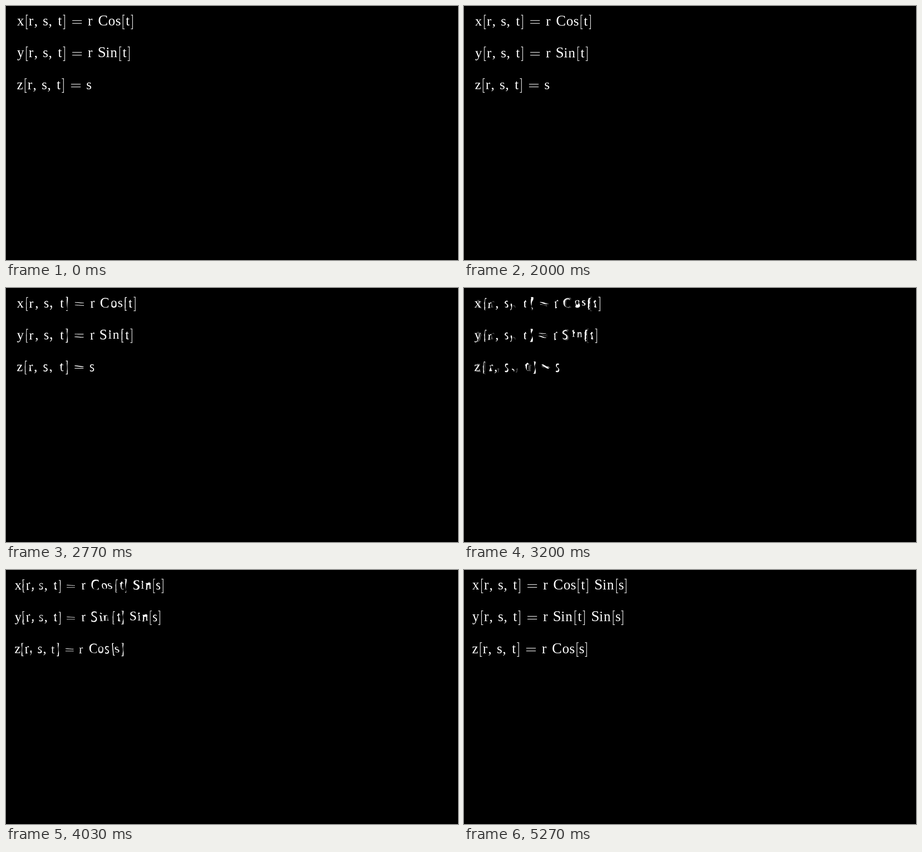
Write an HTML page with a canvas that moves like this. It is 998 by 561 pixels and loops after 7.01 s.

```html
<!DOCTYPE html>
<html lang="en">
<head>
<meta charset="utf-8">
<title>Cylindrical to spherical coordinates</title>
<style>
  html, body { margin: 0; width: 100%; height: 100%; overflow: hidden; background: #000; }
  canvas { display: block; }
</style>
</head>
<body>
<canvas id="stage" width="998" height="561"></canvas>
<script>
const LOOP = 7010, MORPH_START = 2000, MORPH_TIME = 3000;
const EM = 31.68, BASELINE = 43.2, LEADING = 70.2;
const LEFT_BEFORE = 23.7, LEFT_AFTER = 17.5;
const SAMPLES = 150, TRACE_SCALE = 8;

const LINES = [
  ['x[r, s, t] = r Cos[t]', 'x[r, s, t] = r Cos[t] Sin[s]'],
  ['y[r, s, t] = r Sin[t]', 'y[r, s, t] = r Sin[t] Sin[s]'],
  ['z[r, s, t] = s', 'z[r, s, t] = r Cos[s]'],
];

// Advance widths in em
const ADVANCE = {
  x: .528, y: .528, z: .444, r: .392, s: .394, t: .389, o: .5, i: .278, n: .556,
  C: .722, S: .556, '[': .278, ']': .278, ',': .278, '=': .778, ' ': .333,
};

// Thin symbols as bars: x, y above baseline, width, height in em
const BARS = {
  '[': [[.118, .75, .04, 1], [.118, .75, .137, .04], [.118, -.21, .137, .04]],
  ']': [[.119, .75, .04, 1], [.022, .75, .137, .04], [.022, -.21, .137, .04]],
  '=': [[.056, .367, .666, .04], [.056, .173, .666, .04]],
};

const ctx = document.getElementById('stage').getContext('2d');

function drawGlyph(c, char, x, y) {
  c.fillStyle = '#fff';
  if (BARS[char]) {
    for (const [bx, by, w, h] of BARS[char])
      c.fillRect(x + bx * EM, y - by * EM, w * EM, h * EM);
    return;
  }
  const size = /[A-Z]/.test(char) ? 32.8 : 30.6;
  c.font = `${size}px "Liberation Serif", serif`;
  c.textAlign = 'center';
  c.fillText(char, x + ADVANCE[char] * EM / 2, y);
}

function layout(text, x, y) {
  const glyphs = [];
  for (const char of text) {
    if (char !== ' ') glyphs.push({ char, x, y });
    x += ADVANCE[char] * EM;
  }
  return glyphs;
}

// Walk the edges between filled and empty pixels into closed loops
function traceLoops(char) {
  const w = 40 * TRACE_SCALE, h = 48 * TRACE_SCALE, ox = 6, oy = 32;
  const canvas = document.createElement('canvas');
  canvas.width = w;
  canvas.height = h;
  const c = canvas.getContext('2d', { willReadFrequently: true });
  c.scale(TRACE_SCALE, TRACE_SCALE);
  drawGlyph(c, char, ox, oy);
  const data = c.getImageData(0, 0, w, h).data;
  const filled = (x, y) => data[(y * w + x) * 4 + 3] > 127;
  const edges = new Map();
  const addEdge = (x1, y1, x2, y2) => {
    const key = y1 * w + x1;
    if (!edges.has(key)) edges.set(key, []);
    edges.get(key).push(y2 * w + x2);
  };
  for (let y = 1; y < h - 1; y++) {
    for (let x = 1; x < w - 1; x++) {
      if (!filled(x, y)) continue;
      if (!filled(x, y - 1)) addEdge(x, y, x + 1, y);
      if (!filled(x + 1, y)) addEdge(x + 1, y, x + 1, y + 1);
      if (!filled(x, y + 1)) addEdge(x + 1, y + 1, x, y + 1);
      if (!filled(x - 1, y)) addEdge(x, y + 1, x, y);
    }
  }
  const loops = [];
  for (const first of edges.keys()) {
    const loop = [];
    let key = first;
    while (edges.get(key)?.length) {
      loop.push([(key % w) / TRACE_SCALE - ox, Math.floor(key / w) / TRACE_SCALE - oy]);
      key = edges.get(key).pop();
    }
    if (loop.length > 24) loops.push(resample(loop));
  }
  return loops;
}

function resample(loop) {
  const n = loop.length, reach = 2;
  return Array.from({ length: SAMPLES }, (_, k) => {
    const mid = Math.floor(k * n / SAMPLES);
    let x = 0, y = 0;
    for (let d = -reach; d <= reach; d++) {
      const p = loop[(mid + d + n) % n];
      x += p[0];
      y += p[1];
    }
    return [x / (2 * reach + 1), y / (2 * reach + 1)];
  });
}

const outlines = {};
const outline = char => outlines[char] ??= traceLoops(char);

// A missing loop grows out of the last point of the glyph
function loopAt(loops, i) {
  return loops[i] || Array(SAMPLES).fill(loops.at(-1).at(-1));
}

// Repeat glyphs to match the longer line; repeats fade in
function pairGlyphs(before, after) {
  let previous = -1;
  return after.map((to, i) => {
    const index = Math.floor(i * before.length / after.length);
    const from = before[index], fades = index === previous;
    previous = index;
    const a = outline(from.char), b = outline(to.char);
    const loops = Array.from({ length: Math.max(a.length, b.length) },
      (_, k) => [loopAt(a, k), loopAt(b, k)]);
    return { from, to, fades, loops };
  });
}

const before = LINES.map(([text], i) => layout(text, LEFT_BEFORE, BASELINE + i * LEADING));
const after = LINES.map(([, text], i) => layout(text, LEFT_AFTER, BASELINE + i * LEADING));
const pairs = before.flatMap((line, i) => pairGlyphs(line, after[i]));

const lerp = (a, b, t) => a + (b - a) * t;
const sigmoid = v => 1 / (1 + Math.exp(-v));
function smooth(t) {
  const low = sigmoid(-5);
  return (sigmoid(10 * (t - .5)) - low) / (1 - 2 * low);
}

function drawMorph({ from, to, fades, loops }, t) {
  const x = lerp(from.x, to.x, t), y = lerp(from.y, to.y, t);
  ctx.globalAlpha = fades ? t : 1;
  ctx.fillStyle = '#fff';
  ctx.beginPath();
  for (const [a, b] of loops) {
    a.forEach((p, k) =>
      ctx[k ? 'lineTo' : 'moveTo'](x + lerp(p[0], b[k][0], t), y + lerp(p[1], b[k][1], t)));
    ctx.closePath();
  }
  ctx.fill();
  ctx.globalAlpha = 1;
}

function render(time) {
  ctx.fillStyle = '#000';
  ctx.fillRect(0, 0, 998, 561);
  const t = (time - MORPH_START) / MORPH_TIME;
  if (t > 0 && t < 1) {
    for (const pair of pairs) drawMorph(pair, smooth(t));
  } else {
    for (const g of (t <= 0 ? before : after).flat()) drawGlyph(ctx, g.char, g.x, g.y);
  }
}

const start = performance.now();
function tick() {
  render((performance.now() - start) % LOOP);
  requestAnimationFrame(tick);
}
tick();
</script>
</body>
</html>
```
